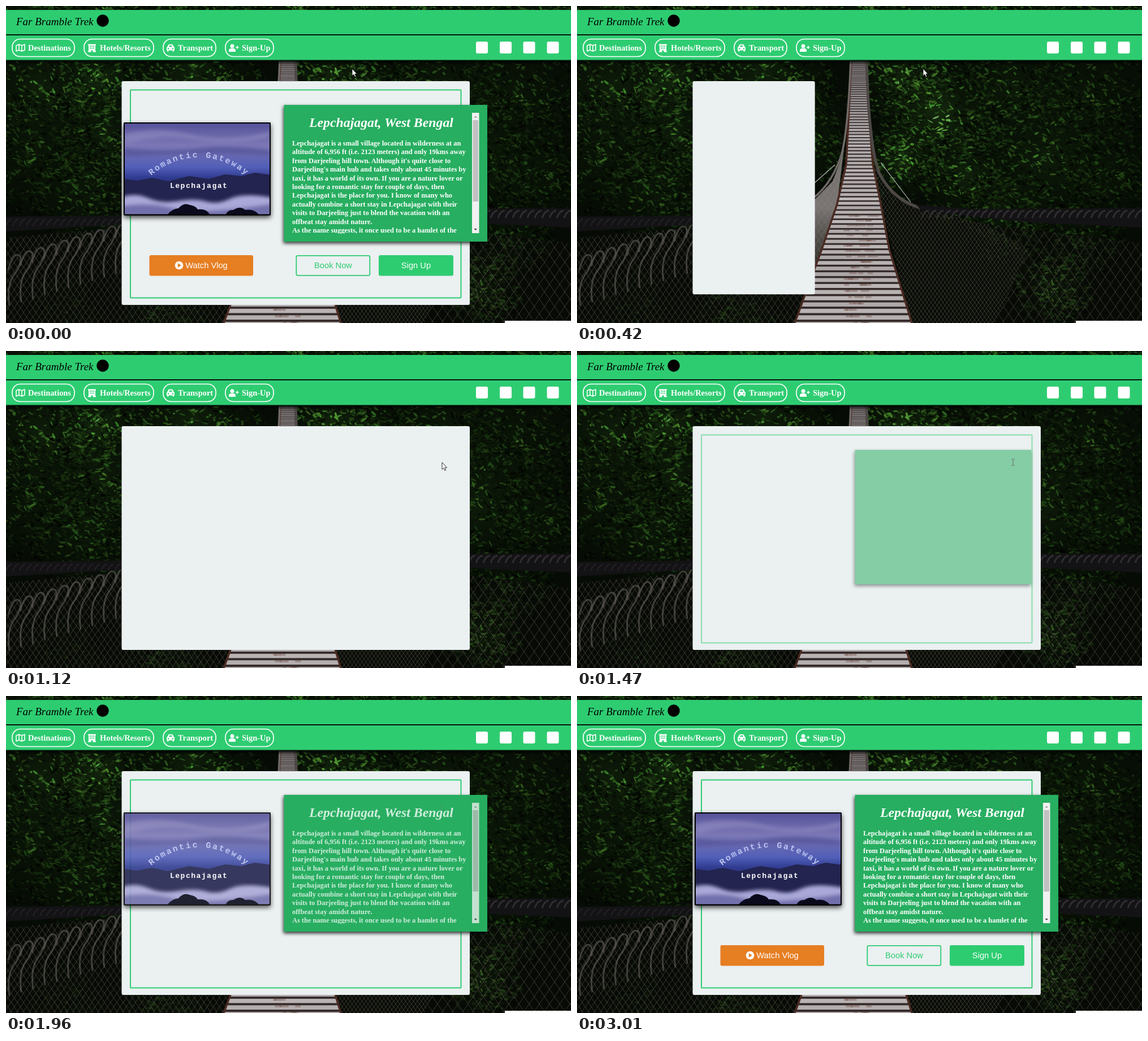
These frames come from a looping animation (999x561 px, 3210 ms). An HTML page with a canvas:

```html
<!DOCTYPE html>
<html lang="en">
<head>
<meta charset="utf-8">
<title>Travel card</title>
<style>
  html, body { margin: 0; width: 100%; height: 100%; overflow: hidden; background: #050805; }
  canvas, svg { position: absolute; left: 0; top: 0; width: 999px; height: 561px; }
  text { white-space: pre; }
  .serif { font: bold 14.4px "Liberation Serif", serif; fill: #fff; }
  .script { font: italic 19px "Liberation Serif", serif; }
  .heading { font: italic bold 23.8px "Liberation Serif", serif; fill: #fff; }
  .body { font: bold 12.4px "Liberation Serif", serif; fill: #fff; }
  .button { font: 14.7px "Liberation Sans", sans-serif; text-anchor: middle; }
  .mono { font: bold 13px "Liberation Mono", monospace; letter-spacing: 1.5px; fill: #fff; }
  .arc { font: bold 15px "Liberation Mono", monospace; letter-spacing: 2.5px; fill: #bcc3ef; }
</style>
</head>
<body>
<canvas id="photo" width="999" height="561"></canvas>
<svg viewBox="0 0 999 561">
  <defs>
    <linearGradient id="sky" x2="0" y2="1">
      <stop offset="0" stop-color="#56529a"/>
      <stop offset=".24" stop-color="#7c78b6"/>
      <stop offset=".36" stop-color="#6668b2"/>
      <stop offset=".48" stop-color="#525fb8"/>
      <stop offset=".6" stop-color="#2e3a8e"/>
      <stop offset="1" stop-color="#26285c"/>
    </linearGradient>
    <linearGradient id="shade" x2="0" y2="1">
      <stop stop-color="#000" stop-opacity=".8"/>
      <stop offset="1" stop-color="#000" stop-opacity="0"/>
    </linearGradient>
    <filter id="soft"><feGaussianBlur stdDeviation="3"/></filter>
    <clipPath id="pictureClip"><rect x="209" y="207" width="258" height="162"/></clipPath>
    <clipPath id="textClip"><rect x="500" y="180" width="322" height="223"/></clipPath>
    <path id="arcPath" d="M257 300A126 126 0 0 1 440 316"/>
  </defs>

  <rect y="97" width="999" height="7" fill="url(#shade)"/>
  <rect y="7" width="999" height="89" fill="#2ecc71"/>
  <path d="M0 51H999M0 96.5H999" stroke="#06140b" stroke-width="1.800"/>
  <text class="script" x="18" y="34">Far Bramble Trek</text>
  <circle cx="171" cy="26" r="10.7"/>
  <g id="nav"></g>
  <g fill="#fff" stroke="none">
    <path d="M18 70l5-2v10l-5 2zM28 70l5-2v10l-5 2zM23 68l5 2v10l-5-2z" fill="none" stroke="#fff" stroke-width="1.6" stroke-linejoin="round"/>
    <path d="M145 67.500h14v2h-1v10h1v2h-5.500v-3h-3v3H145v-2h1v-10h-1z"/>
    <path d="M148 71h8M148 74.500h8" stroke="#2ecc71" stroke-width="1.800" stroke-dasharray="1.800 1.300"/>
    <path d="M284 74q0-1.500 1.500-2l1.300-3q.6-1.300 2-1.300h4.400q1.400 0 2 1.300l1.300 3q1.500.5 1.500 2v4.500h-1v2h-2.500v-2h-7v2H285v-2h-1z"/>
    <path d="M288 72l1-2.300h4l1 2.300z" fill="#2ecc71"/>
    <g fill="#2ecc71"><circle cx="287" cy="75.500" r="1.200"/><circle cx="295" cy="75.500" r="1.200"/></g>
    <circle cx="400" cy="71" r="3.500"/>
    <path d="M394 81v-2q0-4 4-4h4q4 0 4 4v2zM406 72.500h2v-2h1.600v2h2v1.600h-2v2H408v-2h-2z"/>
  </g>
  <g id="social" fill="#fff"></g>
  <rect x="882" y="557" width="117" height="4" fill="#fff"/>

  <rect id="card" x="204.500" y="133" rx="3" fill="#ebf0f1"/>
  <rect id="frame" x="220" y="148.500" width="584.500" height="368" rx="1" fill="none" stroke="#2ecc71" stroke-width="2"/>

  <g id="picture">
    <rect x="208" y="206" width="260" height="164.500" rx="2" style="filter:drop-shadow(0 4px 4px #000b)"/>
    <g clip-path="url(#pictureClip)">
      <rect x="210" y="208" width="256" height="161" fill="url(#sky)"/>
      <g filter="url(#soft)">
        <path d="M210 226q60-14 120 2t136-6v10q-70 14-130 4t-126 8z" fill="#9993c8" opacity=".5"/>
        <path d="M210 252q80 8 130 0t126 4v8q-90-6-256 2z" fill="#4b4b92" opacity=".6"/>
      </g>
      <path d="M208 306l24 3 26-5 28 6 38-9 34 5 30-8 28 3 24-6 28 4v72H208z" fill="#23244f"/>
      <g filter="url(#soft)">
        <path d="M204 338q26-8 48 2t52 5 50 1 42-5 74-2v34H204z" fill="#aaa8d8"/>
        <path d="M204 354q50-8 92 4t174-8v22H204z" fill="#726fac"/>
      </g>
      <path d="M285 370q8-11 20-12 9-11 20-6 11 2 14 8 16-2 22 10zM388 370q4-10 14-9 12-8 21 0 16-3 25 9z" fill="#0a0a1c"/>
    </g>
    <text class="arc"><textPath href="#arcPath">Romantic Gateway</textPath></text>
    <text class="mono" x="290" y="322">Lepchajagat</text>
    <rect x="209" y="207" width="258" height="162.500" rx="1" fill="none" stroke="#000" stroke-width="2"/>
  </g>

  <g id="panel">
    <rect id="panelBox" x="491.500" y="175" fill="#27ae60" style="filter:drop-shadow(-1px 3px 3px #000c)"/>
    <g id="panelText">
      <text class="heading" x="536" y="214">Lepchajagat, West Bengal</text>
      <g id="story" clip-path="url(#textClip)"></g>
      <rect x="824" y="189" width="12.500" height="213" fill="#f1f1f1"/>
      <rect x="825.500" y="202" width="9.500" height="144" fill="#c1c1c1"/>
      <path d="M827.500 197.500h5.500l-2.750-3z" fill="#999"/>
      <path d="M827.500 394h5.500l-2.750 3z" fill="#444"/>
    </g>
  </g>

  <g id="buttons">
    <rect x="253.500" y="441" width="183.500" height="36.500" rx="3" fill="#e67e22"/>
    <circle cx="306" cy="459" r="7.300" fill="#fff"/>
    <path d="M303.800 455.300v7.400l6-3.700z" fill="#e67e22"/>
    <text class="button" x="354.500" y="464" fill="#fff">Watch Vlog</text>
    <rect x="513.300" y="441.800" width="130" height="35" rx="2.500" fill="none" stroke="#2ecc71" stroke-width="1.800"/>
    <text class="button" x="578.500" y="464" fill="#2ecc71">Book Now</text>
    <rect x="659" y="441" width="132" height="36.500" rx="3" fill="#2ecc71"/>
    <text class="button" x="725" y="464" fill="#fff">Sign Up</text>
  </g>

  <path id="arrow" d="M0 0V12.500L2.800 10 4.800 14.500 6.800 13.600 4.900 9.300H8.500Z" fill="#fff" stroke="#000" stroke-width=".8"/>
  <path id="beam" d="M768 191.500h2l1 1 1-1h2M771 192.500v9M768 202.500h2l1-1 1 1h2" fill="none" stroke="#686868"/>
</svg>
<script>
const $ = id => document.getElementById(id);
const set = (id, attrs) => {
  for (const name in attrs) $(id).setAttribute(name, attrs[name]);
};

const story = [
  'Lepchajagat is a small village located in wilderness at an',
  'altitude of 6,956 ft (i.e. 2123 meters) and only 19kms away',
  "from Darjeeling hill town. Although it's quite close to",
  "Darjeeling's main hub and takes only about 45 minutes by",
  'taxi, it has a world of its own. If you are a nature lover or',
  'looking for a romantic stay for couple of days, then',
  'Lepchajagat is the place for you. I know of many who',
  'actually combine a short stay in Lepchajagat with their',
  'visits to Darjeeling just to blend the vacation with an',
  'offbeat stay amidst nature.',
  'As the name suggests, it once used to be a hamlet of the'
];
$('story').innerHTML = story.map((line, i) =>
  `<text class="body" x="506" y="${247 + i * 15.4}">${line}</text>`).join('');

const links = [[10, 112, 39, 'Destinations'], [137, 125, 166, 'Hotels/Resorts'],
  [277, 95, 304, 'Transport'], [387, 87, 417, 'Sign-Up']];
$('nav').innerHTML = links.map(([x, width, textX, label]) =>
  `<rect x="${x + 1}" y="58.500" width="${width - 2}" height="31" rx="14" fill="none" stroke="#fff" stroke-width="1.700"/>
   <text class="serif" x="${textX}" y="79">${label}</text>`).join('');
$('social').innerHTML = [831, 873, 914.5, 956.5].map(x =>
  `<rect x="${x}" y="63" width="21" height="21" rx="3"/>`).join('');

function paintPhoto() {
  const c = $('photo').getContext('2d');
  let seed = 7;
  const random = () => (seed = seed * 16807 % 2147483647) / 2147483647;
  const trace = (points, close) => {
    c.beginPath();
    points.forEach(([x, y]) => c.lineTo(x, y));
    if (close) c.closePath();
  };
  const curve = (d, color, width) => {
    c.strokeStyle = color;
    c.lineWidth = width;
    c.stroke(new Path2D(d));
  };

  c.fillStyle = '#060c05';
  c.fillRect(0, 0, 999, 561);

  // Foliage patches: x, y, radius, lightness
  const patches = [[60, 150, 120, 17], [165, 130, 85, 22], [170, 230, 90, 16], [50, 260, 110, 11],
    [140, 325, 100, 12], [330, 120, 130, 17], [410, 230, 100, 13], [300, 270, 120, 12],
    [575, 130, 85, 21], [640, 190, 110, 24], [575, 270, 80, 22], [690, 300, 90, 18],
    [770, 150, 110, 14], [900, 160, 120, 11], [830, 270, 130, 15], [940, 290, 90, 10],
    [760, 370, 90, 13], [890, 420, 80, 11], [840, 500, 75, 22], [290, 540, 90, 12], [100, 540, 80, 8]];
  for (let x = 60; x < 999; x += 110) patches.push([x, 0, 75, 14]);
  for (const [x, y, r, light] of patches) {
    const glow = c.createRadialGradient(x, y, 0, x, y, r);
    glow.addColorStop(0, `hsla(105 50% ${light * .55}% / .75)`);
    glow.addColorStop(1, 'hsla(105 50% 5% / 0)');
    c.fillStyle = glow;
    c.fillRect(x - r, y - r, 2 * r, 2 * r);
    for (let i = 0; i < r * 6; i++) {
      const angle = random() * 7, d = r * Math.sqrt(random());
      const fade = 1.35 - d / r;
      c.fillStyle = `hsla(${96 + random() * 16} 52% ${light * (.1 + random() ** 1.5 * 2.1) * fade}% / .75)`;
      c.beginPath();
      c.ellipse(x + d * Math.cos(angle), y + d * Math.sin(angle), 2 + random() * 4.5,
        .8 + random() * 1.5, random() * 2 - .7, 0, 7);
      c.fill();
    }
  }

  // Netting below the ropes: outline and mesh width
  const nets = [
    [[[0, 410], [205, 392], [420, 340], [476, 280], [462, 350], [385, 561], [0, 561]], 11],
    [[[523, 280], [565, 335], [620, 362], [720, 385], [800, 430], [740, 561], [592, 561], [537, 350]], 7],
    [[[720, 385], [999, 420], [999, 561], [740, 561], [800, 430]], 18]];
  for (const [outline, mesh] of nets) {
    c.save();
    trace(outline, true);
    c.clip();
    c.fillStyle = 'rgba(8,9,7,.5)';
    c.fillRect(0, 270, 999, 300);
    c.strokeStyle = 'rgba(135,128,118,.3)';
    c.lineWidth = 1.1;
    for (let x = -200; x < 1200; x += mesh) {
      trace([[x, 270], [x + 200, 561]]);
      c.stroke();
      trace([[x, 270], [x - 200, 561]]);
      c.stroke();
    }
    c.restore();
  }
  for (let x = 4; x < 204; x += 21) {
    const y = 468 - x * .3;
    curve(`M${x} ${y}q8-30 18-26t-4 30q-18 20-12 60`, 'rgba(100,96,92,.6)', 3);
  }

  // Sunlit net beside the deck
  const sunlit = c.createLinearGradient(0, 240, 0, 500);
  sunlit.addColorStop(0, 'rgba(150,143,141,.75)');
  sunlit.addColorStop(.45, 'rgba(150,143,141,.8)');
  sunlit.addColorStop(1, 'rgba(110,104,100,.2)');
  c.fillStyle = sunlit;
  trace([[476, 220], [468, 268], [452, 310], [418, 345], [418, 480], [460, 350]], true);
  c.fill();

  // Deck edges: y, left, right
  const edges = [[97, 485, 511], [200, 480, 517], [280, 476, 523], [350, 460, 537], [430, 433, 552], [561, 385, 592]];
  const left = edges.map(([y, x]) => [x, y]), right = edges.map(([y, , x]) => [x, y]);
  c.save();
  trace([...left, ...right.slice().reverse()], true);
  c.fillStyle = '#332a29';
  c.fill();
  c.clip();
  for (let y = 97, step; y < 561; y += step) {
    step = 3 + (y - 97) / 464 * 9;
    const grey = 115 + Math.min(55, (y - 97) / 2.5) + random() * 20;
    c.fillStyle = `rgb(${grey},${grey - 6},${grey - 5})`;
    c.fillRect(380, y, 220, step * .66);
    for (let i = 0; i < 3 && y > 370; i++) {
      c.fillStyle = 'rgba(105,65,52,.35)';
      c.fillRect(470 + random() * 45, y, 5 + random() * 15, step * .3);
    }
  }
  c.restore();
  for (const side of [left, right]) {
    trace(side);
    c.strokeStyle = '#4b2a22';
    c.lineWidth = 3.5;
    c.stroke();
  }

  curve('M484 97Q479 220 468 262 452 312 420 338 340 370 205 379', '#706a68', 3.5);
  curve('M512 97Q516 250 535 297 560 345 610 358 650 366 700 368', '#4d4845', 5);
  curve('M420 313L456 281M537 277L590 347', '#b5b9b8', 1.2);
  c.fillStyle = '#131214';
  trace([[0, 373], [205, 371], [420, 335], [420, 344], [205, 387], [0, 399]], true);
  c.fill();
  trace([[600, 352], [700, 359], [999, 358], [999, 392], [800, 383], [610, 363]], true);
  c.fill();
  for (let x = 610; x < 999; x += 13) curve(`M${x} 375q4-12 12-13`, '#302e30', 3);
  for (let x = 0; x < 200; x += 12) curve(`M${x} 389q4-10 10-12`, '#242225', 2);
}

// CSS "ease" timing: cubic-bezier(.25, .1, .25, 1)
function ease(x) {
  if (x <= 0) return 0;
  if (x >= 1) return 1;
  let low = 0, high = 1, s;
  for (let i = 0; i < 20; i++) {
    s = (low + high) / 2;
    if (.75 * s * (1 - s) + s ** 3 < x) low = s; else high = s;
  }
  return .3 * s * (1 - s) ** 2 + 3 * s * s * (1 - s) + s ** 3;
}

const LOOP = 3210, STEP = 70, LAST = 3010;
const clamp = v => Math.max(0, Math.min(1, v));

function draw(time) {
  const t = Math.min(Math.floor(time % LOOP / STEP) * STEP, LAST);
  const finished = t === 0;
  const fade = (start, duration) => finished ? 1 : ease((t - start) / duration);

  const grow = finished ? 1 : clamp((t - 79) / 971);
  set('card', { width: 615.5 * grow, height: grow ? 367 + 29 * grow : 0 });

  const panel = !finished && t < 1330 ? 0 : fade(1215, 840);
  const lag = (1 - panel) ** 2;
  set('frame', { opacity: panel });
  set('panel', { opacity: panel });
  set('panelBox', { width: 359.5 - 209 * lag, height: 242 - 18 * lag });
  set('panelText', { opacity: fade(1625, 700) });
  set('picture', { opacity: fade(1525, 700) });

  const buttons = fade(2040, 1000);
  set('buttons', { opacity: buttons, transform: `translate(0 ${29 * (1 - buttons)})` });

  const move = clamp((t - 560) / 280), settle = clamp((t - 840) / 140);
  const x = 612 + 146 * move + 13 * settle, y = 111 + 89 * move - 3 * settle;
  set('arrow', { transform: `translate(${x} ${y})`, opacity: finished || t < 1330 ? 1 : 0 });
  set('beam', { opacity: t < 1330 ? 0 : t < 1700 ? 1 : .35 });
}

paintPhoto();
const start = performance.now();
function tick() {
  draw(performance.now() - start);
  requestAnimationFrame(tick);
}
tick();
</script>
</body>
</html>
```
